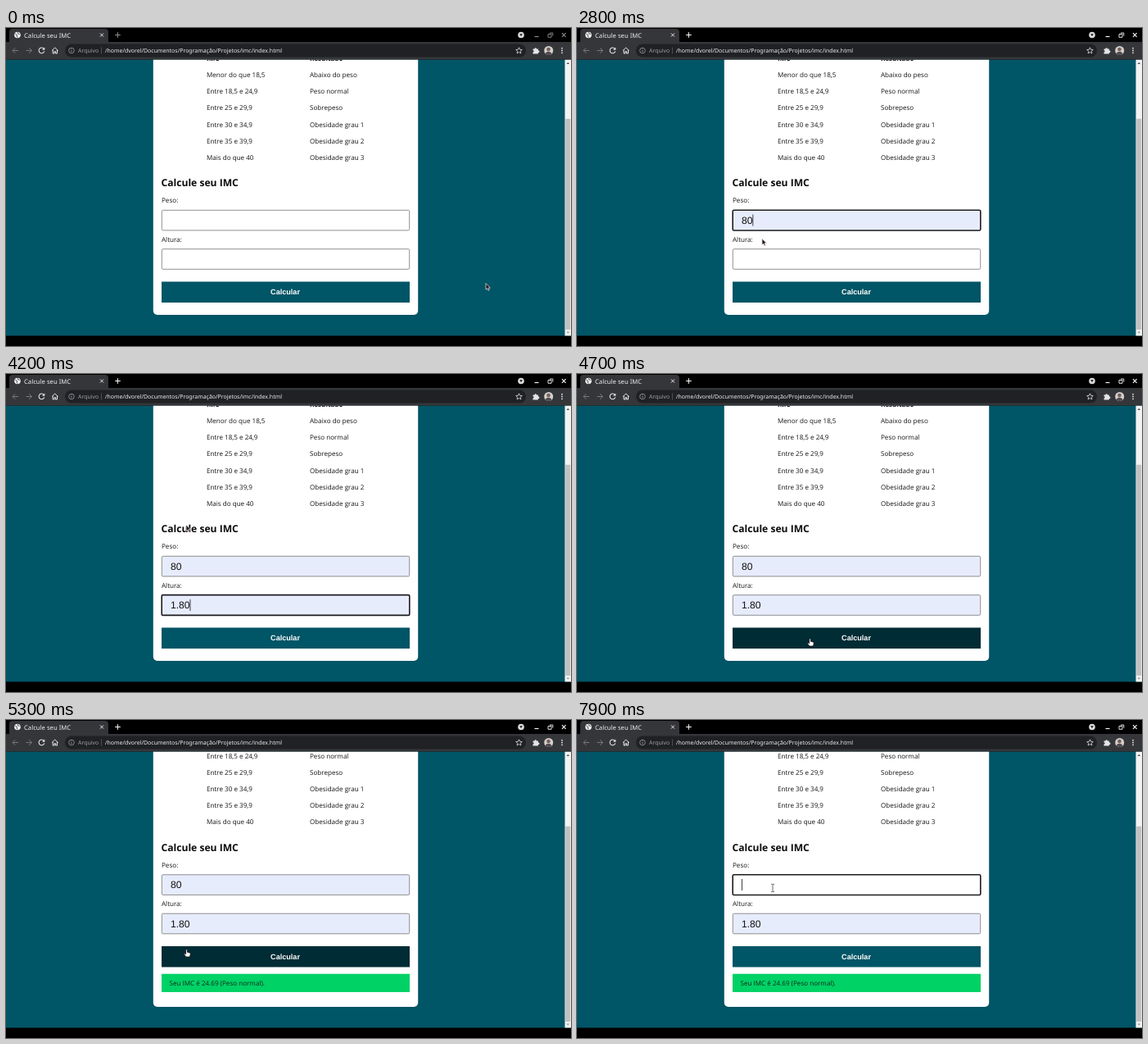
Animation, 690 px wide and 388 px high, one loop 8000 ms. Source, as an HTML page with a canvas:

```html
<!DOCTYPE html>
<html lang="pt-BR">
<head>
<meta charset="utf-8">
<title>Calcule seu IMC</title>
<style>
  html, body { margin: 0; width: 100%; height: 100%; overflow: hidden; background: #000; }
  canvas { display: block; width: 690px; height: 388px; }
</style>
</head>
<body>
<canvas id="stage"></canvas>
<script>
const W = 690, H = 388, LOOP = 8000, STEP = 100;
const canvas = document.getElementById('stage');
const ctx = canvas.getContext('2d');
const ratio = window.devicePixelRatio || 1;
canvas.width = W * ratio;
canvas.height = H * ratio;

const TEAL = '#005566', DARK_TEAL = '#002c35', GREEN = '#00d266', AUTOFILL = '#e7ecfd', INK = '#161616';
const BODY = '8.08px "Open Sans", sans-serif';
const BODY_BOLD = 'bold ' + BODY;
const HEADING = 'bold 12.12px "Open Sans", sans-serif';
const VALUE = '12.12px "Liberation Sans", Arial, sans-serif';
const PREVIEW = '6.73px "Liberation Sans", Arial, sans-serif';
const BUTTON = 'bold 9.09px "Liberation Sans", Arial, sans-serif';
const OPTION = '600 7.7px "Noto Sans", sans-serif';
const TAB = '7.7px "Noto Sans", sans-serif';
const URL_FONT = '6.95px "Noto Sans", sans-serif';

const TABLE = [
  ['Menor do que 18,5', 'Abaixo do peso'],
  ['Entre 18,5 e 24,9', 'Peso normal'],
  ['Entre 25 e 29,9', 'Sobrepeso'],
  ['Entre 30 e 34,9', 'Obesidade grau 1'],
  ['Entre 35 e 39,9', 'Obesidade grau 2'],
  ['Mais do que 40', 'Obesidade grau 3'],
];
const LEFT = 190, WIDTH = 303, ROW = 18.2, VIEW_TOP = 38.5, VIEW_BOTTOM = 375.5;
const FIELD_H = 25.2, BUTTON_Y = 309.6, RESULT_H = 33.5, RESULT_AT = 4800;

const weight = {
  y: 222, opens: 2100, closes: 2800, listY: 248, items: ['80', '70', 'aaa'],
  focus: [[2100, 3200], [6400, LOOP]],
  value: t => t >= 2800 && t < 7800 ? '80' : '',
  edits: [2100, 2800, 6400, 7800], selected: t => t >= 6700 && t < 7800,
};
const height = {
  y: 269.4, opens: 3200, closes: 4200, listY: 174, items: ['1.80', 'aaa', 'dadwadawd', 'adwad', 'aa'],
  focus: [[3200, 4700]],
  value: t => t >= 4200 ? '1.80' : '',
  edits: [3200, 4200], selected: () => false,
};
const fields = [weight, height];

// Pointer moves: start, end, x, y of the destination.
const MOVES = [
  [0, 0, 586, 311.5], [1100, 1900, 235, 231], [2200, 2600, 226, 257], [2800, 3000, 222, 284],
  [3300, 3600, 223, 238], [3700, 4000, 220, 184], [4200, 4600, 284.5, 323],
  [4700, 5100, 220.5, 280], [5500, 6200, 238, 196], [7300, 7600, 239, 205],
];

const smooth = p => { p = Math.min(1, Math.max(0, p)); return p * p * (3 - 2 * p); };

function pointerAt(t) {
  let [, , x, y] = MOVES[0];
  for (const [from, to, nx, ny] of MOVES.slice(1)) {
    const p = smooth((t - from) / (to - from));
    x += (nx - x) * p;
    y += (ny - y) * p;
  }
  return { x, y };
}

function rect(x, y, w, h, fill, radius = 0) {
  ctx.fillStyle = fill;
  ctx.beginPath();
  ctx.roundRect(x, y, w, h, radius);
  ctx.fill();
}

function frame(x, y, w, h, stroke, line, radius = 1.5) {
  ctx.strokeStyle = stroke;
  ctx.lineWidth = line;
  ctx.beginPath();
  ctx.roundRect(x, y, w, h, radius);
  ctx.stroke();
}

function text(str, x, y, font, fill = INK, align = 'left') {
  ctx.font = font;
  ctx.fillStyle = fill;
  ctx.textAlign = align;
  ctx.fillText(str, x, y);
}

function path(d, stroke, line, fill) {
  const shape = new Path2D(d);
  if (fill) { ctx.fillStyle = fill; ctx.fill(shape); }
  if (stroke) { ctx.strokeStyle = stroke; ctx.lineWidth = line; ctx.stroke(shape); }
}

function disc(x, y, r, fill) {
  ctx.fillStyle = fill;
  ctx.beginPath();
  ctx.arc(x, y, r, 0, 7);
  ctx.fill();
}

function ring(x, y, r, stroke, line) {
  ctx.strokeStyle = stroke;
  ctx.lineWidth = line;
  ctx.beginPath();
  ctx.arc(x, y, r, 0, 7);
  ctx.stroke();
}

function drawBrowser(focused) {
  const control = focused ? '#f4f4f4' : '#8c8c8c';
  const icon = '#e4e5e7', dim = '#77797c';
  rect(0, 0, W, 17.5, '#000');
  rect(4, 1, 121, 18, '#35363a', [4, 4, 0, 0]);
  rect(0, 17, W, 21.5, '#35363a');
  rect(72, 19.5, 563, 16, '#202124', 8);

  disc(14, 8.5, 3.8, '#f1f1f1');
  path('M11.3 7.2l2.2 1.2l-.4 1.5l1 1.6M14.2 5.2l.4 1.6l2 .6', '#35363a', 0.9);
  text('Calcule seu IMC', 22, 11.5, TAB, '#eeeeee');
  path('M115 6.5l4 4m0-4l-4 4', icon, 1);
  path('M133.2 8.5h6.6M136.5 5.2v6.6', control, 1);

  path('M15 27.5H8m3.3-3.3L8 27.5l3.3 3.3', dim, 1);
  path('M24.5 27.5h7m-3.3-3.3l3.3 3.3l-3.3 3.3', dim, 1);
  path('M46.3 25.4a3.4 3.4 0 1 0 .5 3', icon, 1.1);
  path('M47.3 23.5v3.2h-3.2z', null, 0, icon);
  path('M56 27.6l3.8-3.6l3.8 3.6M57.2 27v4h1.9v-2.4h1.5V31h1.9v-4', icon, 1);
  ring(80, 27.5, 3.3, '#9aa0a6', 0.8);
  path('M80 27v2.2M80 25.4v.8', '#9aa0a6', 0.9);
  text('Arquivo', 88, 30, URL_FONT, '#9aa0a6');
  path('M116.5 23.5v8', '#5f6368', 0.7);
  text('/home/dvorel/Documentos/Programação/Projetos/imc/index.html', 121, 30, URL_FONT, '#eceef0');
  path('M626.5 23.8l1.1 2.5l2.7.2l-2 1.8l.6 2.6l-2.4-1.4l-2.4 1.4l.6-2.6l-2-1.8l2.7-.2z', icon, 0.8);
  path('M643.5 25.5h2a1.2 1.2 0 1 1 2.4 0h2v2.1a1.2 1.2 0 1 1 0 2.3v1.6h-6.4v-2a1.1 1.1 0 1 0 0-2.2z', null, 0, icon);

  ctx.save();
  ctx.beginPath();
  ctx.arc(662.7, 27.5, 5.5, 0, 7);
  ctx.clip();
  rect(657, 22, 12, 12, '#d3cfcd');
  disc(662.5, 26, 2.3, '#765f59');
  disc(662.5, 33, 4.3, '#504a50');
  ctx.restore();
  for (const y of [24.7, 27.5, 30.3]) disc(679, y, 0.9, icon);

  disc(629, 8.5, 3.8, '#dadada');
  path('M627.2 7.3h3.6l-1.8 2.6z', null, 0, '#111');
  path('M645.5 10.5h5', control, 1.2);
  frame(662, 7.5, 4, 3.8, control, 0.9, 0);
  path('M663.8 6h4v3.6', control, 0.9);
  path('M679 6.2l4.6 4.6m0-4.6l-4.6 4.6', control, 1.2);
}

function drawScrollbar(scroll, grown) {
  const doc = 420 + grown, track = 321, top = 47;
  rect(682.5, VIEW_TOP, 7.5, VIEW_BOTTOM - VIEW_TOP, '#f3f3f3');
  rect(683.2, top + track * (83.5 + scroll) / doc, 6, track * 336.5 / doc, '#c1c1c1');
  path('M684.5 44l1.8-2.2l1.8 2.2z', null, 0, '#555');
  path('M684.5 370.5l1.8 2.2l1.8-2.2z', null, 0, '#999');
}

function drawField(field, t, preview) {
  const value = field.value(t);
  const focused = field.focus.some(([from, to]) => t >= from && t < to);
  const base = field.y + 16.7, textX = LEFT + 11;
  rect(LEFT, field.y, WIDTH, FIELD_H, value || preview ? AUTOFILL : '#fff', 1.5);
  if (focused) frame(LEFT + 0.2, field.y + 0.2, WIDTH - 0.4, FIELD_H - 0.4, '#1c1c20', 1.6);
  else frame(LEFT + 0.3, field.y + 0.3, WIDTH - 0.6, FIELD_H - 0.6, '#858585', 0.9);

  ctx.font = VALUE;
  const valueWidth = ctx.measureText(value).width;
  if (field.selected(t)) rect(textX, field.y + 5.5, valueWidth, 14, '#8fc8ee');
  if (preview) text(preview, textX, field.y + 16.3, PREVIEW, '#222');
  else text(value, textX, base, VALUE, '#111');

  const lastEdit = Math.max(...field.edits.filter(e => e <= t));
  if (focused && !field.selected(t) && (t - lastEdit) % 1000 < 500) {
    rect(textX + valueWidth, field.y + 5.5, 0.8, 14, '#111');
  }
}

function drawPage(t, scroll, hover, hoverButton) {
  const shown = t >= RESULT_AT;
  rect(0, VIEW_TOP, W, VIEW_BOTTOM - VIEW_TOP, TEAL);
  ctx.save();
  ctx.beginPath();
  ctx.rect(0, VIEW_TOP, 682.5, VIEW_BOTTOM - VIEW_TOP);
  ctx.clip();
  ctx.translate(0, -scroll);
  rect(179.8, -20, 323.4, 370 + (shown ? RESULT_H : 0), '#fff', 5);

  [['IMC', 'Resultado'], ...TABLE].forEach((cells, i) => {
    cells.forEach((cell, col) => text(cell, 245 + 126 * col, 40 + 20.15 * i, i ? BODY : BODY_BOLD));
  });
  text('Calcule seu IMC', LEFT - 0.5, 193, HEADING, '#0b0b0b');
  text('Peso:', LEFT, 213.4, BODY);
  text('Altura:', LEFT, 260.9, BODY);
  fields.forEach(field => drawField(field, t, hover && hover.field === field ? field.items[hover.row] : ''));

  rect(LEFT, BUTTON_Y, WIDTH, 25.3, hoverButton ? DARK_TEAL : TEAL);
  text('Calcular', LEFT + WIDTH / 2 - 0.5, 325.3, BUTTON, '#fff', 'center');
  if (shown) {
    rect(LEFT, 343.2, WIDTH, 22.4, GREEN);
    text('Seu IMC é 24.69 (Peso normal).', 199.5, 357.1, BODY, '#102818');
  }
  ctx.restore();
}

function drawList(field, hover) {
  const h = field.items.length * ROW + 2;
  ctx.save();
  ctx.shadowColor = 'rgba(0,0,0,.18)';
  ctx.shadowBlur = 2;
  rect(LEFT, field.listY, 97, h, '#fff');
  ctx.restore();
  field.items.forEach((item, i) => {
    const y = field.listY + i * ROW;
    if (hover && hover.row === i) rect(LEFT, y, 97, ROW, '#e7e7e7');
    text(item, 195.5, y + 12, OPTION, '#222');
  });
}

const inBox = ({ x, y }, top, h) => x > LEFT && x < LEFT + WIDTH && y > top && y < top + h;

function drawPointer({ x, y }, kind) {
  ctx.save();
  ctx.translate(x, y);
  if (kind === 'beam') {
    path('M-2-4.6H-.6L0-4L.6-4.6H2M0-4V4M-2 4.6H-.6L0 4L.6 4.6H2', '#fff', 2);
    path('M-2-4.6H-.6L0-4L.6-4.6H2M0-4V4M-2 4.6H-.6L0 4L.6 4.6H2', '#555', 0.9);
  } else if (kind === 'hand') {
    path('M-.9 .6Q0-.8.9.6V3.2L4 4Q5 4.5 4.7 6L4 9H-.8L-3 5.8Q-3 4.6-1.8 5L-.9 5.8Z', '#111', 0.8, '#fff');
  } else {
    path('M0 0V7.6L1.7 6.1L2.9 8.8L4.2 8.2L3.1 5.6H5.3Z', '#e9d6d6', 0.8, '#17181b');
  }
  ctx.restore();
}

function draw(t) {
  const pointer = pointerAt(t);
  const scroll = RESULT_H * smooth((t - 4990) / 310);
  const onPage = { x: pointer.x, y: pointer.y + scroll };
  const open = fields.find(f => t >= f.opens && t < f.closes);
  let hover = null;
  if (open) {
    const row = Math.floor((pointer.y - open.listY) / ROW);
    if (row >= 0 && row < open.items.length) hover = { field: open, row };
  }
  const overButton = inBox(onPage, BUTTON_Y, 25.3);
  const overField = !hover && fields.some(f => inBox(onPage, f.y, FIELD_H));

  ctx.setTransform(ratio, 0, 0, ratio, 0, 0);
  ctx.textRendering = 'geometricPrecision';
  rect(0, 0, W, H, '#000');
  drawPage(t, scroll, hover, overButton);
  if (open) drawList(open, hover);
  drawScrollbar(scroll, t >= RESULT_AT ? RESULT_H : 0);
  drawBrowser(t >= 1200);
  drawPointer(pointer, overButton ? 'hand' : overField ? 'beam' : 'arrow');
}

const start = performance.now();
function tick() {
  const t = (performance.now() - start) % LOOP;
  draw(Math.floor(t / STEP) * STEP);
  requestAnimationFrame(tick);
}
tick();
</script>
</body>
</html>
```
